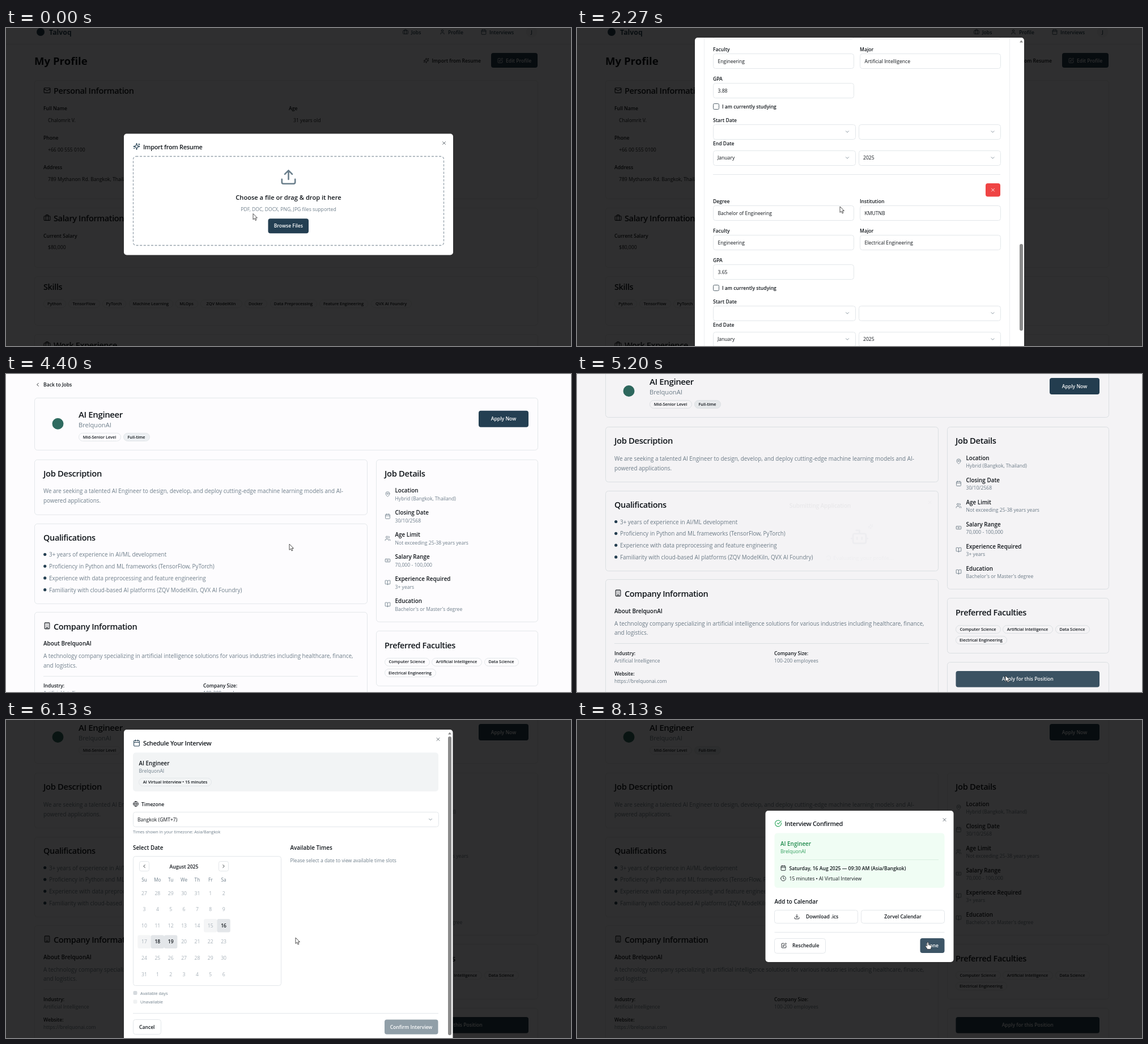
These frames come from a looping animation (997 by 561 pixels, 8200 ms). An HTML page:

```html
<!DOCTYPE html>
<html lang="en">
<head>
<meta charset="utf-8">
<title>Job application flow</title>
<style>
  html, body { margin: 0; width: 100%; height: 100%; overflow: hidden; background: #fdfcfe; }
  svg { display: block; width: 100vw; height: 100vh; font-family: "Open Sans", "Noto Sans", sans-serif; }
</style>
</head>
<body>
<svg id="stage" viewBox="0 0 997 561"></svg>
<script>
const LOOP = 8200;
const INK = '#11161b', NAVY = '#243f52', HOVER = '#3d5566', MUTED = '#6f7f8b', LINE = '#e3e7ea', PAGE = '#fdfcfe';
const BRAND = 'Talvoq', COMPANY = 'BrelquonAI';
const SM = 8.6, XS = 7.35, MD = 9.9, LG = 11.1;

const ROUND = 'M2 12a10 10 0 1 0 20 0a10 10 0 1 0-20 0';
const TRAY = 'M21 15v4a2 2 0 0 1-2 2H5a2 2 0 0 1-2-2v-4';
const ICONS = {
  x: 'M18 6 6 18M6 6l12 12',
  spark: 'M9.9 15.5A2 2 0 0 0 8.5 14.1L2.4 12.5a.5.5 0 0 1 0-1L8.5 9.9A2 2 0 0 0 9.9 8.5l1.6-6.1a.5.5 0 0 1 1 0L14.1 8.5a2 2 0 0 0 1.4 1.4l6.1 1.6a.5.5 0 0 1 0 1l-6.1 1.6a2 2 0 0 0-1.4 1.4l-1.6 6.1a.5.5 0 0 1-1 0zM20 3v4M22 5h-4M4 17v2M5 18H3',
  mail: 'M4 4h16a2 2 0 0 1 2 2v12a2 2 0 0 1-2 2H4a2 2 0 0 1-2-2V6a2 2 0 0 1 2-2zM22 7l-9 5.7a2 2 0 0 1-2 0L2 7',
  job: 'M4 6h16a2 2 0 0 1 2 2v10a2 2 0 0 1-2 2H4a2 2 0 0 1-2-2V8a2 2 0 0 1 2-2zM16 20V4a2 2 0 0 0-2-2h-4a2 2 0 0 0-2 2v16',
  user: 'M19 21v-2a4 4 0 0 0-4-4H9a4 4 0 0 0-4 4v2M8 7a4 4 0 1 0 8 0a4 4 0 1 0-8 0',
  users: 'M16 21v-2a4 4 0 0 0-4-4H6a4 4 0 0 0-4 4v2M5 7a4 4 0 1 0 8 0a4 4 0 1 0-8 0M22 21v-2a4 4 0 0 0-3-3.9M16 3.1a4 4 0 0 1 0 7.8',
  cal: 'M8 2v4M16 2v4M5 4h14a2 2 0 0 1 2 2v14a2 2 0 0 1-2 2H5a2 2 0 0 1-2-2V6a2 2 0 0 1 2-2zM3 10h18',
  edit: 'M12 3H5a2 2 0 0 0-2 2v14a2 2 0 0 0 2 2h14a2 2 0 0 0 2-2v-7M18.4 2.6a2.1 2.1 0 0 1 3 3l-9 9-4 1 1-4z',
  pin: 'M20 10c0 5-5.5 10.2-7.4 11.8a1 1 0 0 1-1.2 0C9.5 20.2 4 15 4 10a8 8 0 0 1 16 0zM9 10a3 3 0 1 0 6 0a3 3 0 1 0-6 0',
  down: 'm6 9 6 6 6-6', left: 'm15 18-6-6 6-6', right: 'm9 18 6-6-6-6',
  building: 'M6 2h12a2 2 0 0 1 2 2v16a2 2 0 0 1-2 2H6a2 2 0 0 1-2-2V4a2 2 0 0 1 2-2zM9 22v-4h6v4M8 6h.01M12 6h.01M16 6h.01M8 10h.01M12 10h.01M16 10h.01M8 14h.01M12 14h.01M16 14h.01',
  book: 'M12 7v14M3 18a1 1 0 0 1-1-1V4a1 1 0 0 1 1-1h5a4 4 0 0 1 4 4 4 4 0 0 1 4-4h5a1 1 0 0 1 1 1v13a1 1 0 0 1-1 1h-6a3 3 0 0 0-3 3 3 3 0 0 0-3-3z',
  cash: 'M4 6h16a2 2 0 0 1 2 2v8a2 2 0 0 1-2 2H4a2 2 0 0 1-2-2V8a2 2 0 0 1 2-2zM10 12a2 2 0 1 0 4 0a2 2 0 1 0-4 0M6 12h.01M18 12h.01',
  globe: ROUND + 'M12 2a14.5 14.5 0 0 0 0 20 14.5 14.5 0 0 0 0-20M2 12h20',
  check: 'M21.8 10A10 10 0 1 1 17 3.3M9 11l3 3L22 4',
  clock: ROUND + 'M12 6v6l4 2',
  upload: TRAY + 'M17 8l-5-5-5 5M12 3v12',
  download: TRAY + 'M7 10l5 5 5-5M12 15V3',
  bot: 'M12 8V4H8M6 8h12a2 2 0 0 1 2 2v8a2 2 0 0 1-2 2H6a2 2 0 0 1-2-2v-8a2 2 0 0 1 2-2zM2 14h2M20 14h2M15 13v2M9 13v2',
  loader: 'M21 12a9 9 0 1 1-6.2-8.6'
};

// Drawing helpers; text and icons are placed by their vertical centre.
const text = (x, y, s, size = SM, fill = INK, weight = 400, attrs = '') =>
  `<text x="${x}" y="${y + size * .36}" font-size="${size}" fill="${fill}" font-weight="${weight}" ${attrs}>${s}</text>`;
const bold = (x, y, s, size = SM, fill = INK, attrs = '') => text(x, y, s, size, fill, 600, attrs);
const mid = (x, y, s, size = SM, fill = INK, weight = 600, id = '') => text(x, y, s, size, fill, weight, `text-anchor="middle" ${id}`);
const head = (x, y, s, size = 14.5) => bold(x, y, s, size, INK, `letter-spacing="${-.025 * size}"`);
// Outlined boxes sit on pixel centres so their borders stay crisp.
function box(x, y, w, h, fill = PAGE, stroke = 'none', r = 4, attrs = '') {
  if (stroke !== 'none') [x, y, w, h] = [Math.floor(x) + .5, Math.floor(y) + .5, Math.round(w), Math.round(h)];
  return `<rect x="${x}" y="${y}" width="${w}" height="${h}" rx="${r}" fill="${fill}" stroke="${stroke}" ${attrs}/>`;
}
const dot = (x, y, r, fill) => `<circle cx="${x}" cy="${y}" r="${r}" fill="${fill}"/>`;
const rule = (x1, x2, y, color = LINE) => `<path d="M${x1} ${Math.floor(y) + .5}H${x2}" stroke="${color}"/>`;
const icon = (name, x, y, size = 10.4, color = INK, attrs = '') =>
  `<g transform="translate(${x} ${y}) scale(${size / 24})"><path ${attrs} transform="translate(-12 -12)" d="${ICONS[name]}" fill="none" stroke="${color}" stroke-width="2" stroke-linecap="round" stroke-linejoin="round"/></g>`;
const group = (id, body, attrs = '') => `<g id="${id}" ${attrs}>${body}</g>`;
const each = (list, fn) => list.map(fn).join('');
const button = (x, y, w, h, label, id = '') => box(x, y, w, h, NAVY, 'none', 4, id) + mid(x + w / 2, y + h / 2, label, SM, '#fff');
const outline = (x, y, w, h, label) => box(x, y, w, h, '#fff', LINE) + mid(x + w / 2, y + h / 2, label);
const badge = (left, right, y, label, fill = PAGE) =>
  box(left - 7, y - 7, right - left + 14, 14, fill, LINE, 7) + mid((left + right) / 2, y, label, XS);
const panel = (x, y, w, h) => box(x, y, w, h, '#fff', 'none', 5);
const card = (x, y, w, h) => box(x, y, w, h, PAGE, LINE, 5);
const select = (x, y, w, label) => box(x, y, w, 26, '#fff', LINE) + text(x + 8, y + 13, label) + icon('down', x + w - 13.5, y + 13, 10, MUTED);
const closer = (x, y) => icon('x', x, y, 10, '#4b555d');

function header() {
  return dot(61, 7, 7, NAVY) + text(76, 8, BRAND, 12.3, NAVY, 700) +
    each([['job', 705, 'Jobs'], ['user', 770, 'Profile'], ['cal', 843, 'Interviews']],
      ([name, x, s]) => icon(name, x, 7, 10.4, NAVY) + bold(x + 10, 7.5, s, SM, NAVY)) +
    dot(927.5, 7, 10, '#f0f2f4') + mid(927.5, 7.5, 'J', SM, NAVY);
}

function profilePage() {
  const fields = [
    [66, 142, 'Full Name', 'Chalomrit V.'], [499, 142, 'Age', '31 years old'],
    [66, 194, 'Phone', '+66 00 555 0100'], [66, 246, 'Address', '789 Mythanon Rd. Bangkok, Thailand'],
    [66, 366.5, 'Current Salary', '$80,000']];
  const skills = [
    [73, 98, 'Python'], [117, 158, 'TensorFlow'], [177, 204, 'PyTorch'], [224, 287, 'Machine Learning'],
    [306, 331, 'MLOps'], [350, 409, 'ZQV ModelKiln'], [428, 453, 'Docker'], [473, 541, 'Data Preprocessing'],
    [560, 631, 'Feature Engineering'], [651, 708, 'QVX AI Foundry']];
  return box(0, 0, 997, 561, PAGE, 'none', 0) + header() + rule(0, 997, 28) +
    text(50, 58.5, 'My Profile', 18.6, INK, 700) + icon('spark', 741.5, 57.5) + bold(751.5, 57.5, 'Import from Resume') +
    box(856, 44, 82, 26, NAVY) + icon('edit', 872, 57.5, 10.4, '#fff') + bold(882, 57.5, 'Edit Profile', SM, '#fff') +
    each([[92, 209], [317, 105], [438, 86], [540, 90]], ([y, h]) => card(50, y, 888, h)) +
    icon('mail', 72.5, 110, 13) + head(84, 111, 'Personal Information') +
    icon('job', 72.5, 335, 13) + head(84, 336, 'Salary Information') +
    head(66, 456.5, 'Skills') + icon('job', 72.5, 559, 13) + head(84, 560, 'Work Experience') +
    each(fields, ([x, y, label, value]) => bold(x, y, label) + text(x + 8, y + 20.5, value)) +
    each(skills, ([a, b, s]) => badge(a, b, 486.5, s));
}

function boardPage() {
  const jobs = [
    ['AI Engineer', COMPANY, 'Mid-Senior Level', 60, '3', '30/10/2568', 'Hybrid (Bangkok, Thailand)', 95, '#3dbb6c', '#2f6b60'],
    ['Backend Developer', 'Plimvortex', 'Senior Level', 43, '2', '15/9/2568', 'Remote', 75, '#f0aa1c', '#3f7f6c'],
    ['Frontend Developer', 'Nulb Inc.', 'Mid Level', 34, '3', '30/8/2568', 'Bangkok, Thailand', 45, '#ee4444', '#2b5f70']];
  return box(0, 0, 997, 561, PAGE, 'none', 0) + group('', header(), 'transform="translate(4.5 0)"') + rule(0, 997, 28) +
    text(54.5, 58.5, 'Job Board', 19, INK, 700) +
    box(574, 44.5, 166, 26, '#fff', LINE) + text(582, 58, 'Search jobs or companies...', SM, MUTED) +
    select(748, 44.5, 93, 'All Levels') + select(849, 44.5, 93, 'Match %') +
    each(jobs, ([title, firm, level, width, open, date, place, match, color, logo], i) => {
      const x = 54.5 + i * 301.2;
      const facts = [['users', open + ' openings'], ['cal', 'Closes: ' + date], ['pin', place]];
      return (i ? '' : group('lift', box(x + 2, 95, 281.5, 157, '#000', 'none', 5, 'opacity=".17" filter="url(#soft)"'))) +
        card(x, 86, 285.5, 162) + dot(x + 31.5, 117, 6, logo) + head(x + 55.5, 112, title, LG) +
        text(x + 55.5, 127.5, firm, SM, MUTED) + badge(x + 262.5 - width, x + 262.5, 109.5, level) +
        each(facts, ([name, s], k) => icon(name, x + 21.5, 147.5 + k * 20.8, 10.4, MUTED) + text(x + 32, 148 + k * 20.8, s, SM, MUTED)) +
        dot(x + 19, 220, 2.8, color) + bold(x + 26.8, 220.5, match + '% match') +
        button(x + 203, 208.3, 66.5, 23.6, 'View Details', i ? '' : 'id="view"');
    });
}

function detailPage() {
  const skills = ['3+ years of experience in AI/ML development', 'Proficiency in Python and ML frameworks (TensorFlow, PyTorch)',
    'Experience with data preprocessing and feature engineering', 'Familiarity with cloud-based AI platforms (ZQV ModelKiln, QVX AI Foundry)'];
  const facts = [['pin', 'Location', 'Hybrid (Bangkok, Thailand)'], ['cal', 'Closing Date', '30/10/2568'],
    ['users', 'Age Limit', 'Not exceeding 25-38 years years'], ['cash', 'Salary Range', '70,000 - 100,000'],
    ['book', 'Experience Required', '3+ years'], ['book', 'Education', "Bachelor's or Master's degree"]];
  const firm = [[66, 492.5, 'Industry:', 'Artificial Intelligence'], [348, 492.5, 'Company Size:', '100-200 employees'],
    [66, 528.5, 'Website:', 'https://brelquonai.com']];
  const para = (y, s, x = 66) => text(x, y, s, MD, MUTED);
  return box(0, -100, 997, 700, PAGE, 'none', 0) +
    group('', header() + rule(0, 997, 28), 'transform="translate(0 -97)"') +
    icon('left', 56, -39, 10.4) + bold(66, -39, 'Back to Jobs') +
    card(50, -16, 888, 92) + dot(91.5, 30, 10, '#2f6b60') + head(128, 14, 'AI Engineer', 15) + text(128, 32.5, COMPANY, LG, MUTED) +
    badge(135, 195, 53.5, 'Mid-Senior Level') + badge(214, 246, 53.5, 'Full-time', '#edf0f3') + button(834, 7, 88, 29, 'Apply Now') +
    card(50, 93, 586.5, 96.5) + head(66, 118, 'Job Description', 14.8) +
    para(149, 'We are seeking a talented AI Engineer to design, develop, and deploy cutting-edge machine learning models and AI-') +
    para(166, 'powered applications.') +
    card(50, 206, 586.5, 140.5) + head(66, 230.5, 'Qualifications') +
    each(skills, (s, i) => dot(68.7, 260.5 + i * 20.8, 2.6, NAVY) + para(261 + i * 20.8, s, 76)) +
    card(50, 362.5, 586.5, 230) + icon('building', 72.5, 386.5, 13) + head(84, 388, 'Company Information') +
    bold(66, 418, 'About ' + COMPANY, MD) +
    para(440, 'A technology company specializing in artificial intelligence solutions for various industries including healthcare, finance,') +
    para(456.5, 'and logistics.') + rule(66, 621, 475) +
    each(firm, ([x, y, a, b]) => bold(x, y, a) + text(x, y + 13, b, SM, MUTED)) +
    card(653, 93, 285, 286) + head(668, 118, 'Job Details', 14.8) +
    each(facts, ([name, a, b], i) => {
      const y = 148 + i * 39;
      return icon(name, 673.5, y + 6.2, 10.4, MUTED) + bold(686.5, y, a, MD) + text(686.5, y + 14, b, SM, MUTED);
    }) +
    card(653, 395, 285, 97) + head(668, 420.5, 'Preferred Faculties') +
    badge(675, 740, 450, 'Computer Science') + badge(758, 832, 450, 'Artificial Intelligence') +
    badge(851, 897, 450, 'Data Science') + badge(675, 751, 469.5, 'Electrical Engineering') +
    card(653, 508, 285, 80) + button(668.5, 524, 253.5, 28.5, 'Apply for this Position', 'id="apply"') +
    mid(795, 564, 'Note: This position closes on the date listed', XS, MUTED, 400);
}

function uploadModal() {
  return panel(208, 186.5, 581, 214) + icon('spark', 230.5, 209, 13, NAVY) + head(242, 210, 'Import from Resume', 10.9) + closer(773, 203) +
    box(224.5, 226.5, 548, 157, 'none', '#98a4ad', 5, 'stroke-width="1.3" stroke-dasharray="4 2.6"') +
    icon('upload', 498.5, 263, 31.2, '#6b7f8c') + mid(498.5, 299.5, 'Choose a file or drag &amp; drop it here', LG) +
    mid(498.5, 320, 'PDF, DOC, DOCX, PNG, JPG files supported', SM, MUTED, 400) + button(462.5, 336.3, 71.5, 26, 'Browse Files', 'id="browse"');
}

function analyzeModal() {
  return panel(208, 167, 581, 253) + icon('spark', 230.5, 189.5, 13, NAVY) + head(242, 190.5, 'Import from Resume', 10.9) + closer(773, 183) +
    `<circle cx="498.5" cy="258.5" r="30" fill="none" stroke="#d8dde1" stroke-width="2.6"/>
     <circle id="ring" cx="498.5" cy="258.5" r="30" fill="none" stroke="${NAVY}" stroke-width="2.6" pathLength="360" stroke-dasharray="265 95"/>` +
    icon('spark', 498.5, 258.5, 21, '#6b7f8c') + mid(498.5, 315.5, 'AI is analyzing your resume...', LG) +
    mid(498.5, 337, 'Extracting information and skills', MD, MUTED, 400) +
    box(374, 359.8, 249, 5.2, '#eef1f3', 'none', 2.6) + box(374, 359.8, 0, 5.2, NAVY, 'none', 2.6, 'id="bar"') +
    mid(498.5, 377, '', SM, MUTED, 400, 'id="percent"');
}

function field(x, y, label, value) {
  return bold(x, y, label) + box(x, y + 7.5, 248, 26, '#fff', LINE) + text(x + 8.5, y + 20.5, value);
}

function entry(y, labels, values, check) {
  const range = (dy, label, a, b) => bold(240, y + dy, label) +
    select(240, y + dy + (a ? 12 : 7.5), 250.5, a) + select(497, y + dy + (a ? 12 : 7.5), 250, b);
  return box(721, y - 32, 26, 23.4, '#ef4444') + icon('x', 734, y - 20.3, 10, '#fff') +
    each(labels, (s, i) => field(i % 2 ? 499 : 240, y + 52 * (i >> 1), s, values[i])) +
    box(240.5, y + 147.5, 10, 10, '#fff', '#55636d', 2) + bold(256, y + 152.5, check) +
    range(176.5, 'Start Date', '', '') + range(218, 'End Date', 'January', '2025');
}

function formModal() {
  const study = ['Degree', 'Institution', 'Faculty', 'Major', 'GPA'], work = ['Position', 'Company', 'Level', 'Location', 'Salary'];
  const person = [['Full Name', 'Chalomrit V.'], ['Age', '31'], ['Phone', '+66 00 555 0100'], ['Address', '789 Mythanon Rd. Bangkok, Thailand']];
  const studying = 'I am currently studying', working = 'I currently work here';
  const body = icon('spark', 230.5, 40.5, 13, NAVY) + head(242, 41, 'Import from Resume', 10.9) + closer(762, 34) +
    each([[60, 158], [234, 90], [340, 740], [1096, 110], [1222, 635]], ([y, h]) => box(224, y, 539, h, '#fff', '#eceff1', 5)) +
    head(240, 82, 'Personal Information') + each(person, ([a, b], i) => field(i % 2 ? 499 : 240, 112 + 52 * (i >> 1), a, b)) +
    head(240, 258, 'Skills') + badge(248, 273, 290, 'Python') + badge(292, 333, 290, 'TensorFlow') + badge(352, 379, 290, 'PyTorch') +
    head(240, 364, 'Work Experience') +
    entry(430, work, ['AI Engineer', 'Plimvortex', 'Senior', 'Bangkok', '$80,000'], working) + rule(240, 747, 702) +
    entry(750, work, ['ML Engineer', 'Nulb Inc.', 'Junior', 'Bangkok', '$60,000'], working) +
    head(240, 1120, 'Salary Information') + field(240, 1150, 'Current Salary', '$80,000') +
    head(240, 1240, 'Education') +
    entry(1265, study, ['Master of Engineering', 'KMUTNB', 'Engineering', 'Artificial Intelligence', '3.88'], studying) + rule(240, 747, 1537) +
    entry(1585, study, ['Bachelor of Engineering', 'KMUTNB', 'Engineering', 'Electrical Engineering', '3.65'], studying) +
    outline(606, 1899, 52, 26, 'Cancel') + button(666, 1899, 97, 26, 'Save Information');
  return panel(208, 17, 581, 553) + group('', group('form', body), 'clip-path="url(#modalClip)"') +
    '<path d="M781 25.5l3-4 3 4z" fill="#8a8a8a"/>' + box(781, 27, 6, 153, '#8a8a8a', 'none', 3, 'id="thumb"');
}

function submitModal() {
  return panel(353, 213, 291, 161) + head(368.5, 229, 'Submitting Application', 10.9) + closer(629, 223) +
    group('bot', icon('bot', 498.5, 287, 36, '#6b7f8c') + icon('spark', 519, 268, 10, '#6b7f8c')) +
    group('loader', icon('loader', 0, 0, 10.4, MUTED)) + text(450, 326, 'Evaluating your profile...', MD, MUTED);
}

function scheduleModal() {
  const dayX = i => 244 + 23.35 * i, dayY = r => 305.5 + 28.6 * r;
  const cells = Array.from({length: 42}, (_, i) => {
    const n = i - 4, label = n < 1 ? n + 31 : n > 31 ? n - 31 : n, x = dayX(i % 7), y = dayY(i / 7 | 0);
    const open = [16, 18, 19].includes(n), fill = open ? '#e3e6e9' : [15, 17].includes(n) ? '#f4f5f6' : 'none';
    return box(x - 11.7, y - 11.7, 23.4, 23.4, fill, 'none', 3) + mid(x, y, label, SM, open ? INK : '#a7b1b9', open ? 600 : 400);
  }).join('');
  const slots = ['09:00 AM', '09:30 AM', '10:00 AM', '10:30 AM', '11:00 AM', '01:00 PM', '01:30 PM', '02:00 PM'];
  return panel(208, 17, 580.5, 553) + icon('cal', 230.5, 40.5, 13, NAVY) + head(242, 41, 'Schedule Your Interview', 10.9) + closer(762.5, 34) +
    box(224, 57.5, 539, 68.5, '#f2f4f5', 'none', 5) + bold(234.5, 76, 'AI Engineer', MD) + text(234.5, 90, COMPANY, SM, MUTED) +
    badge(241.5, 355.5, 109.5, 'AI Virtual Interview • 15 minutes', '#f2f4f5') +
    icon('globe', 229, 148, 10.4) + bold(239, 148.5, 'Timezone') + select(224, 162.5, 538.5, 'Bangkok (GMT+7)') +
    text(224, 197, 'Times shown in your timezone: Asia/Bangkok', XS, MUTED) +
    bold(224, 225.5, 'Select Date', MD) + bold(501.5, 225.5, 'Available Times', MD) +
    text(501.5, 247.5, 'Please select a date to view available time slots', SM, MUTED) +
    box(224.5, 240.5, 260.5, 227.5, '#fff', LINE) + each([[244, 'left'], [384, 'right']], ([x, n]) => box(x - 8.5, 249.5, 17, 17, '#fff', LINE, 3) + icon(n, x, 258, 10)) +
    mid(314, 258.5, 'August 2025') + each(['Su', 'Mo', 'Tu', 'We', 'Th', 'Fr', 'Sa'], (s, i) => mid(dayX(i), 282.5, s, 8.2, MUTED, 400)) + cells +
    box(224.5, 478, 7, 7, '#d5dade', 'none', 2) + text(237, 482, 'Available days', XS, MUTED) +
    box(224.5, 493.5, 7, 7, '#f0f2f3', 'none', 2) + text(237, 497.5, 'Unavailable', XS, MUTED) +
    rule(224, 763, 517.5) + outline(224.5, 528.5, 48.5, 26, 'Cancel') +
    box(668, 528.5, 94.5, 26, '#919fa8', 'none', 4, 'id="confirm"') + mid(715, 542, 'Confirm Interview', SM, '#fff') +
    group('picked', box(500, 238, 262, 20, '#fff') + box(dayX(6) - 11.7, dayY(2) - 11.7, 23.4, 23.4, NAVY, 'none', 3) +
      mid(dayX(6), dayY(2), 16, SM, '#fff') + each(slots, (s, i) => outline(501.5 + i % 2 * 134, 241 + (i >> 1) * 31, 127, 24, s))) +
    group('slot', button(635.5, 241, 127, 24, '09:30 AM')) +
    '<path d="M780 25.5l3-4 3 4z" fill="#8a8a8a"/>' + box(780, 29, 6, 527, '#8a8a8a', 'none', 3);
}

function doneModal() {
  return panel(332.5, 160, 332, 267) + icon('check', 355, 182.5, 13, '#22a355') + head(366.5, 183.5, 'Interview Confirmed', 10.9) + closer(648.5, 176) +
    box(348.5, 199.5, 300, 96.5, '#f0fdf4', 'none', 5) + bold(359, 218, 'AI Engineer', MD, '#1f8a4c') + text(359, 232, COMPANY, SM, '#2f9e5c') +
    rule(359, 638, 246.5, '#d8f0e1') + icon('cal', 364, 261) + bold(374.5, 261.5, 'Saturday, 16 Aug 2025 — 09:30 AM (Asia/Bangkok)') +
    icon('clock', 364, 279.5) + text(374.5, 279.5, '15 minutes • AI Virtual Interview') +
    bold(348.5, 320, 'Add to Calendar', MD) + outline(348.5, 335, 147, 23.4, '') + icon('download', 388, 347) + bold(404, 347, 'Download .ics') +
    outline(501.5, 335, 147, 23.4, 'Zorvel Calendar') + rule(348.5, 648.5, 374.5) +
    outline(348.5, 385, 89.5, 26, '') + icon('edit', 365, 398) + bold(380, 398, 'Reschedule') +
    button(605.5, 385, 43, 26, 'Done', 'id="done"');
}

const POINTERS =
  group('arrow', '<path d="M0 0V10.4L2.5 8.2 4.1 12 5.9 11.2 4.3 7.5H7.4z" fill="#fff" stroke="#222" stroke-width=".8" stroke-linejoin="round"/>') +
  group('hand', '<path d="M-1.2 7V1a1.2 1.2 0 0 1 2.4 0V4.6l4 .8a1.6 1.6 0 0 1 1.3 1.7C6.4 9 5.8 10 5.4 12.4H-.8C-1.4 10.6-3 9.4-4 7.6-4.4 6.4-3 5.7-2.2 6.3z" fill="#fff" stroke="#222" stroke-width=".8" stroke-linejoin="round"/>');

document.getElementById('stage').innerHTML =
  '<defs><clipPath id="modalClip"><rect x="208" y="17" width="581" height="553" rx="5"/></clipPath>' +
  '<filter id="soft" x="-10%" y="-10%" width="120%" height="125%"><feGaussianBlur stdDeviation="3"/></filter></defs>' +
  group('profile', profilePage()) + group('board', boardPage()) + group('detail', detailPage()) +
  box(0, 0, 997, 561, '#000', 'none', 0, 'id="shade"') +
  group('upload', uploadModal()) + group('analyze', analyzeModal()) + group('import', formModal()) +
  group('submit', submitModal()) + group('schedule', scheduleModal()) + group('success', doneModal()) + POINTERS;

const el = {};
document.querySelectorAll('[id]').forEach(node => el[node.id] = node);
const show = (id, on) => el[id].setAttribute('display', on ? 'inline' : 'none');
const set = (id, name, value) => el[id].setAttribute(name, value);

// Eased interpolation through rows of [time, ...values].
function track(keys, t) {
  const i = keys.findIndex(k => k[0] > t);
  if (i < 1) return (i ? keys[keys.length - 1] : keys[0]).slice(1);
  const a = keys[i - 1], b = keys[i], u = (t - a[0]) / (b[0] - a[0]), e = u * u * (3 - 2 * u);
  return a.slice(1).map((v, k) => v + (b[k + 1] - v) * e);
}

const CURSOR = [[0, 436, 327.5], [70, 436, 327.5], [400, 487, 347], [600, 487, 347], [1100, 413, 261.5], [1400, 413, 261.5],
  [1700, 464, 315], [2400, 464, 315], [2540, 714, 534], [2620, 714, 534], [2900, 717, 5], [3030, 717, 5], [3500, 277, 216],
  [3870, 277, 216], [4200, 500, 300], [4600, 500, 300], [4950, 756, 532], [5600, 756, 532], [6000, 511, 384], [6200, 511, 384],
  [6480, 384, 360], [6600, 384, 360], [6800, 690, 252], [6930, 690, 252], [7200, 712, 538], [7350, 712, 538], [7900, 619, 392]];
const SCROLL = [[1730, 0], [2200, 1279], [2290, 1279], [2400, 1373]];
const PROGRESS = [[1470, 19], [1640, 100]];
const HANDS = [[250, 800], [2510, 2650], [2850, 3040], [3420, 3830], [6420, 6620], [6760, 6960], [7130, 7330], [7820, 8200]];

function draw(t) {
  const within = (a, b) => t >= a && t < b;
  const clamp = v => Math.max(0, Math.min(1, v));
  show('profile', t < 3000);
  show('board', within(3000, 3830));
  show('detail', t >= 3830);
  show('upload', t < 930);
  show('analyze', within(930, 1670));
  show('import', within(1670, 2600));
  show('submit', within(5130, 5830));
  show('schedule', within(5830, 7330));
  show('success', t >= 7330);

  const fade = clamp((t - 5195) / 140);
  set('shade', 'opacity', .81 * (t < 2600 || t >= 5830 ? 1 : t < 5130 ? 0 : fade));
  set('submit', 'opacity', fade);
  const zoom = .95 + .05 * fade;
  set('submit', 'transform', `translate(498.5 293.5) scale(${zoom}) translate(-498.5 -293.5)`);
  set('bot', 'transform', `translate(0 ${-1.5 * Math.abs(Math.sin((t - 5200) / 130))})`);
  set('loader', 'transform', `translate(441 326) rotate(${t * .8})`);

  set('browse', 'fill', within(250, 800) ? HOVER : NAVY);
  set('view', 'fill', t > 3420 ? HOVER : NAVY);
  show('lift', t > 3350);
  set('apply', 'fill', within(4880, 5300) ? HOVER : NAVY);
  set('done', 'fill', t > 7820 ? HOVER : NAVY);

  const percent = t < 1470 ? Math.max(0, (t - 930) * .0353) : track(PROGRESS, t)[0];
  set('bar', 'width', 2.49 * percent);
  el.percent.textContent = Math.round(percent) + '% complete';
  set('ring', 'transform', `rotate(${246 + (t - 1270) * .72} 498.5 258.5)`);

  const [scroll] = track(SCROLL, t);
  set('form', 'transform', `translate(0 ${-scroll})`);
  set('thumb', 'y', 27 + scroll / 1373 * 380);
  const [offset] = track([[4170, 97], [4700, 0]], t);
  set('detail', 'transform', `translate(0 ${offset})`);

  show('picked', t >= 6530);
  show('slot', t >= 6870);
  set('confirm', 'fill', t < 6870 ? '#919fa8' : t < 7130 ? NAVY : HOVER);

  const [x, y] = track(CURSOR, t), hand = HANDS.some(([a, b]) => within(a, b));
  show('hand', hand);
  show('arrow', !hand);
  set(hand ? 'hand' : 'arrow', 'transform', `translate(${x} ${y})`);
}

const start = performance.now();
function tick() {
  draw((performance.now() - start) % LOOP);
  requestAnimationFrame(tick);
}
tick();
</script>
</body>
</html>
```
